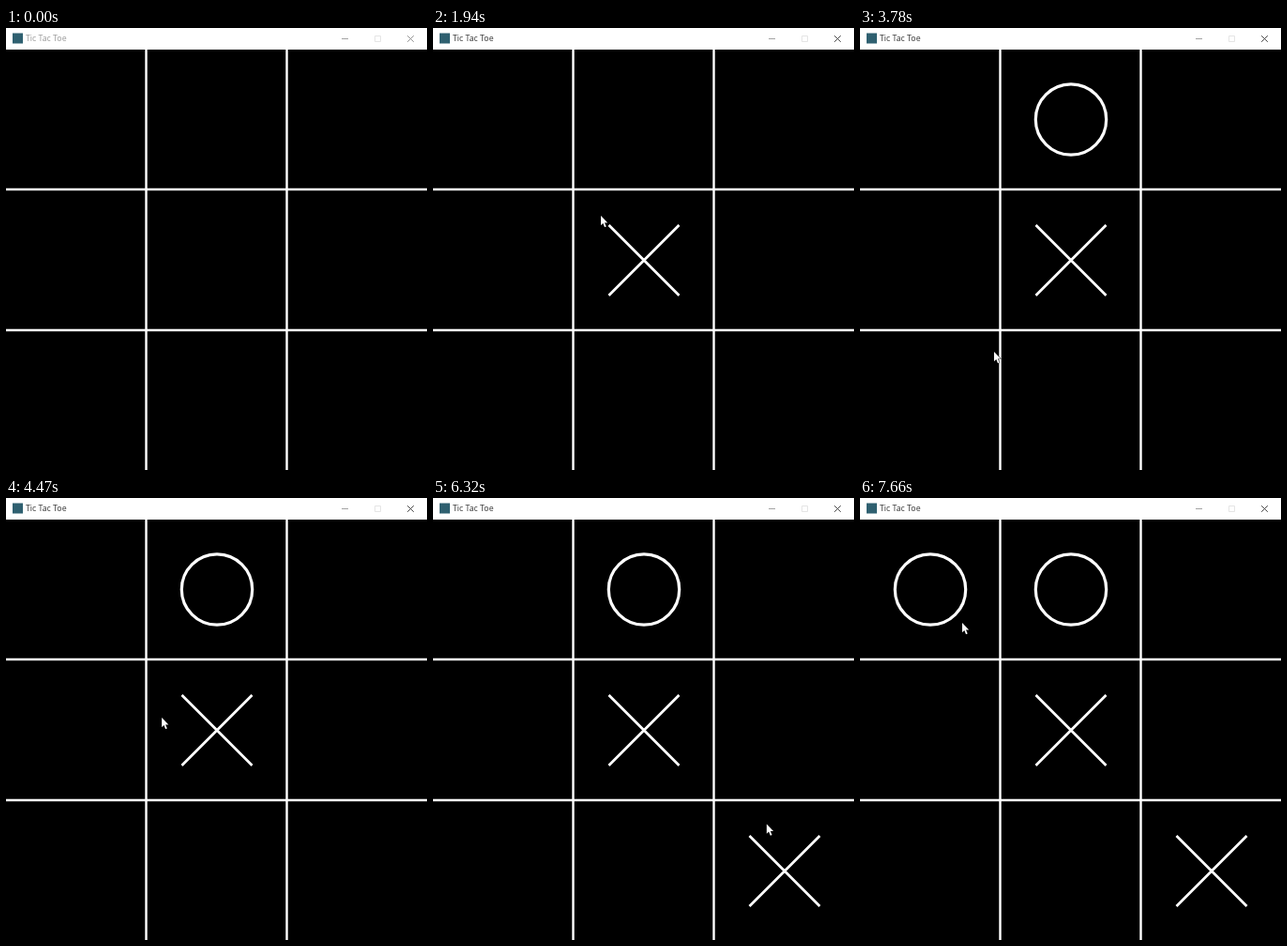
These frames come from a looping animation (449x471 px, 8 s). An HTML page:

```html
<!DOCTYPE html>
<html lang="en">
<head>
<meta charset="utf-8">
<title>Tic Tac Toe</title>
<style>
  html, body { margin: 0; height: 100%; overflow: hidden; background: #000; }
  svg { display: block; width: 100vw; height: 100vh; }
  text { font: 8.8px "Open Sans", "Noto Sans", sans-serif; }
  .mark { fill: none; stroke: #fff; }
</style>
</head>
<body>
<svg viewBox="0 0 449 471">
  <defs>
    <path id="cross" class="mark" stroke-width="2.8" d="M-37.5-37.5l75 75M37.5-37.5l-75 75"/>
    <circle id="ring" class="mark" stroke-width="3.2" r="37.7"/>
  </defs>

  <rect width="449" height="471"/>
  <path d="M149.5 23V471M299.5 23V471M0 172H449M0 322H449" stroke="#fff" stroke-width="2.4"/>

  <rect width="449" height="23" fill="#fff"/>
  <rect x="7" y="5.5" width="11" height="11" fill="#2f6070"/>
  <text id="caption" x="21" y="14.4">Tic Tac Toe</text>
  <g fill="none" stroke-width=".9">
    <path d="M358 11.5h7" stroke="#999"/>
    <path d="M393.5 8.5h6v6h-6z" stroke="#e2e2e2"/>
    <path id="close" d="M428.2 8.2l6.6 6.6M434.8 8.2l-6.6 6.6"/>
  </g>

  <g id="marks">
    <use href="#cross" x="225" y="247.5" data-tick="8"/>
    <use href="#ring" x="225" y="97.5" data-tick="28"/>
    <use href="#cross" x="375" y="397.5" data-tick="68"/>
    <use href="#ring" x="75" y="97.5" data-tick="94"/>
  </g>
  <path id="cursor" d="M0 0V10.2L2.3 8 4 12.2 5.7 11.5 4 7.4H7.2Z" fill="#fff" stroke="#000" stroke-width=".8" paint-order="stroke"/>
</svg>
<script>
const LOOP = 8000, START = 370, TICK = 77.3;   // the pointer is sampled once per tick
const FOCUS_TICK = 7;
const ENTRY = { x: 252, y: 414 };

// Each glide runs to a resting point; bow bends the straight way there.
const glides = [
  { from: 0, to: 5, x: 220, y: 264 },
  { from: 16, to: 25, x: 181, y: 120, bow: [-24, 0] },
  { from: 35, to: 37, x: 217, y: 139 },
  { from: 40, to: 44, x: 143, y: 345 },
  { from: 44, to: 51, x: 213, y: 262, bow: [125, 50] },
  { from: 51, to: 62, x: 205, y: 346, bow: [-84, -80] },
  { from: 62, to: 66, x: 384, y: 382 },
  { from: 76, to: 85, x: 109, y: 133, bow: [7, -20] },
];

const get = id => document.getElementById(id);
const caption = get('caption'), close = get('close'), cursor = get('cursor');
const marks = [...get('marks').children];

function pointerAt(tick) {
  let { x, y } = ENTRY;
  for (const { from, to, x: endX, y: endY, bow = [0, 0] } of glides) {
    if (tick < from) break;
    const p = Math.min(1, (tick - from) / (to - from));
    const bend = Math.sin(Math.PI * p);
    x += (endX - x) * p + bow[0] * bend;
    y += (endY - y) * p + bow[1] * bend;
  }
  return [x.toFixed(2), y.toFixed(2)];
}

function show(node, visible) {
  node.setAttribute('visibility', visible ? 'visible' : 'hidden');
}

function draw(now) {
  const tick = Math.floor((now % LOOP - START) / TICK + .05);
  const focused = tick >= FOCUS_TICK;
  caption.setAttribute('fill', focused ? '#333' : '#999');
  close.setAttribute('stroke', focused ? '#333' : '#888');
  for (const mark of marks) show(mark, tick >= mark.dataset.tick);
  show(cursor, tick >= 0);
  cursor.setAttribute('transform', `translate(${pointerAt(tick)})`);
}

const begin = performance.now();
function frame() {
  draw(performance.now() - begin);
  requestAnimationFrame(frame);
}
frame();
</script>
</body>
</html>
```
